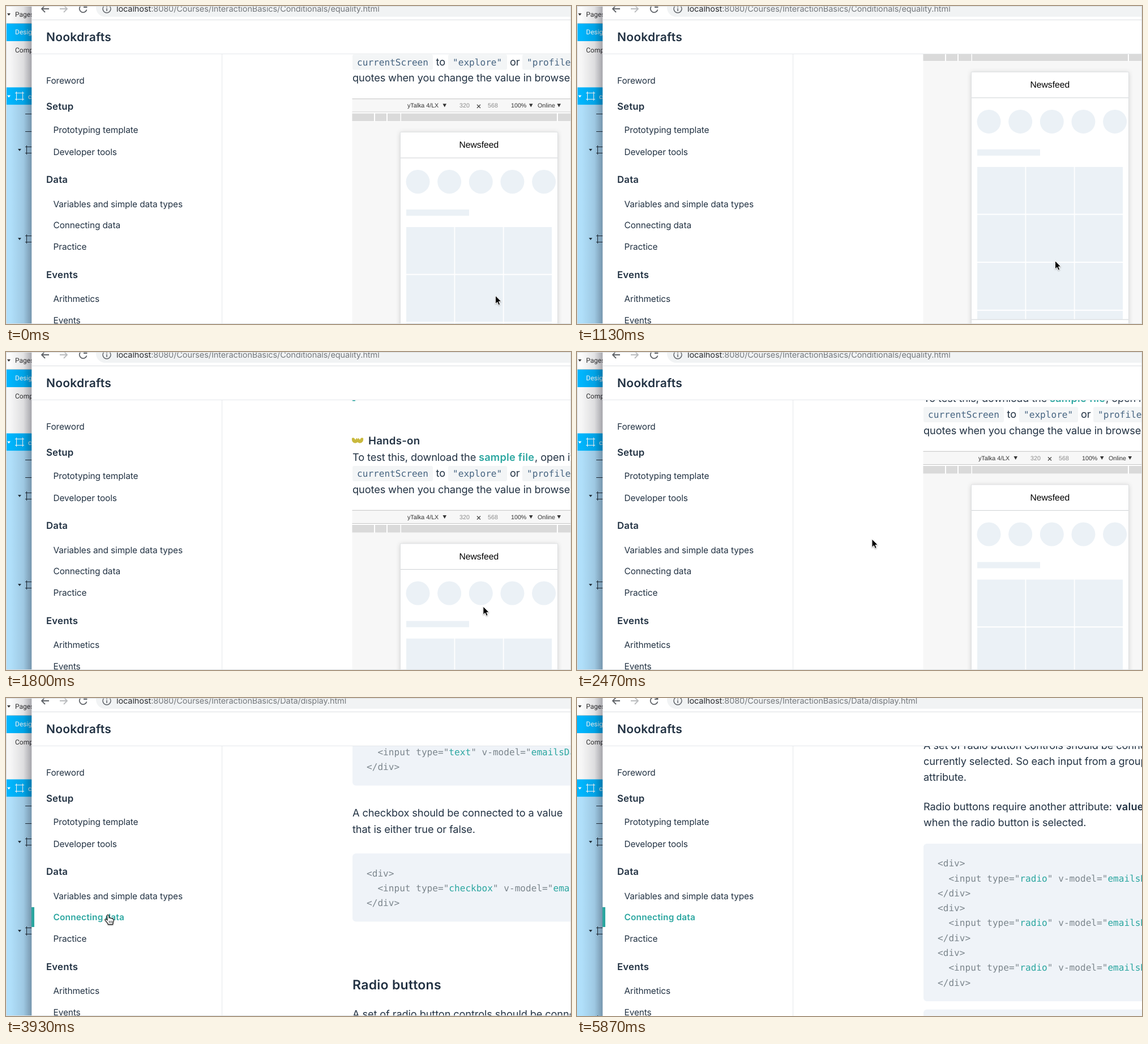
These frames come from a looping animation (998x561 px, 6870 ms). An HTML page:

```html
<!DOCTYPE html>
<html lang="en">
<head>
<meta charset="utf-8">
<title>Course page</title>
<style>
html, body { margin: 0; width: 100%; height: 100%; overflow: hidden; background: #fff; }
svg { display: block; position: absolute; left: 0; top: 0; }
text { white-space: pre; font-family: Inter, sans-serif; font-optical-sizing: none; letter-spacing: -.006em; text-rendering: geometricPrecision; }
.b { font-weight: 600; letter-spacing: .012em; }
.m { font-family: "DejaVu Sans Mono", monospace; letter-spacing: 0; }
.h { font-family: "Liberation Sans", Arial, sans-serif; letter-spacing: 0; }
.r { font-family: Roboto, sans-serif; letter-spacing: 0; }
.phone { filter: drop-shadow(0 1px 4px rgba(0,0,0,.16)); }
.cursor { filter: drop-shadow(0 1px 1px rgba(0,0,0,.3)); }
</style>
</head>
<body>
<script>
const INK = '#223243', TEAL = '#2ba6a0', LINE = '#e5e8eb', PALE = '#ebf1f6', GREY = '#a5afb9';
const LOOP = 6870, STEP = 200 / 3;

const esc = s => s.replace(/&/g, '&amp;').replace(/</g, '&lt;');
const rect = (x, y, w, h, fill, more = '') =>
  `<rect x="${x}" y="${y}" width="${w}" height="${h}" fill="${fill}" ${more}/>`;
const dot = (x, y, r, fill, more = '') => `<circle cx="${x}" cy="${y}" r="${r}" fill="${fill}" ${more}/>`;
const path = (d, more) => `<path d="${d}" ${more}/>`;
const line = (d, color, w = 1) => path(d, `fill="none" stroke="${color}" stroke-width="${w}"`);
const text = (x, y, s, size, fill = INK, cls = '', more = '') =>
  `<text x="${x}" y="${y}" font-size="${size}" fill="${fill}" class="${cls}" ${more}>${esc(s)}</text>`;
const body = (x, y, s) => text(x, y, s, 18.2);
const group = (id, inner, more = '') => `<g id="${id}" ${more}>${inner}</g>`;
const down = (x, y, w, h, fill) => path(`M${x} ${y}h${w}l${-w / 2} ${h}z`, `fill="${fill}"`);

// Design tool behind the browser window
function backdrop() {
  const frame = (x, y, c) => line(
    `M${x - 5.5} ${y - 8}v16M${x + 5.5} ${y - 8}v16M${x - 8} ${y - 5.5}h16M${x - 8} ${y + 5.5}h16`, c, 1.1);
  let s = rect(0, 0, 46, 143, '#f6f6f6') + rect(0, 0, 46, 31, '#fcfcfc')
    + rect(0, 31, 46, 31, '#00b5fd') + rect(0, 143.5, 46, 31, '#00b5fd') + rect(0, 174.5, 46, 387, '#b0dffa')
    + line('M0 30.5H46', '#d4d4d4')
    + down(2, 13, 6, 4, '#333') + text(16, 18.5, 'Pages', 12, '#333', 'r')
    + text(16, 50, 'Design', 12, '#fff', 'r') + text(16, 81.5, 'Components', 12, '#333', 'r')
    + down(2, 157.5, 6, 4, '#fff') + frame(24, 159, '#fff') + text(39, 164, 'c', 12, '#fff', 'r')
    + line('M34 190.5H46M34 221.5H46', '#25333d', 1.2);
  for (const y of [254, 411, 568]) s += down(21, y - 2, 6, 4, '#25333d') + frame(42, y, '#25333d');
  return s + rect(8, 0, 38, 561, 'url(#shade)');
}

function browserBar() {
  return rect(45.3, 0, 953, 561, '#fff')
    + rect(159, -13, 900, 32, '#f1f3f4', 'rx="16"')
    + line('M76 5H63M69 -1L63 5L69 11', '#5f6368', 1.8)
    + line('M95 5H108M102 -1L108 5L102 11', '#babcbe', 1.8)
    + line('M141.5 1A6.5 6.5 0 1 0 142.5 6.5M142.5 -3V2H137', '#5f6368', 1.8)
    + line('M171 5a7 7 0 1 0 14 0a7 7 0 1 0 -14 0M178 4V9M178 1V2.6', '#5f6368', 1.5)
    + `<text x="195" y="10" font-size="14.5" fill="#74787c"><tspan fill="#2b2d30">localhost</tspan>`
    + `<tspan>:8080/Courses/InteractionBasics/</tspan><tspan id="file"></tspan></text>`
    + line('M45 24.5H998', '#dcdfe2')
    + text(71, 62, 'Nookdrafts', 21, INK, 'b')
    + line('M45 84.5H998M381.5 85V561', LINE);
}

const links = [['Prototyping template', 224], ['Developer tools', 263], ['Variables and simple data types', 354.5],
  ['Connecting data', 392], ['Practice', 430], ['Arithmetics', 521.5], ['Events', 560]];
function sidebar() {
  return text(71, 137, 'Foreword', 15.4)
    + [['Setup', 183], ['Data', 312], ['Events', 480]].map(([s, y]) => text(71, y, s, 16.8, INK, 'b')).join('')
    + links.map(([s, y], i) => text(83.5, y, s, 15.4, INK, '', `id="link${i}"`)).join('')
    + rect(45, 369, 5, 35, TEAL, 'id="bar"');
}

// First page: hands-on section with the phone preview
const cols = [707, 793.3, 879.6];
function explore() {
  let s = rect(707, 474.5, 111, 11, PALE);
  for (let i = 0; i < 5; i++) s += dot(727.5 + 55.65 * i, 425.5, 21, PALE);
  for (let r = 0; r < 4; r++) for (const x of cols) s += rect(x, 505.5 + 84.6 * r, 84.5, r < 3 ? 82.6 : 15, PALE);
  return s;
}
function profile() {
  return dot(734.5, 425.5, 28, PALE) + rect(776, 411.5, 125, 11, PALE) + rect(776, 429, 75, 10.5, PALE)
    + cols.map(x => rect(x, 481.5, 84.5, 18.5, PALE)).join('')
    + rect(707, 516, 257, 173.5, PALE) + rect(707, 704, 257, 71, PALE);
}
function lesson() {
  const pill = (x, w, s) => rect(x, 201, w, 27, '#f3f5f6', 'rx="3"') + text(x + 8, 220, s, 16.1, '#476582', 'm');
  let s = rect(612, 84, 5, 2.5, TEAL)
    + path('M611 152q3-2 5 1l1 2l2-3q2 0 2 3q0-3 2-3l2 3l1-2q2-3 5-1q1 5-3 8q-4 2-7-1q-3 3-7 1q-4-3-3-8z', 'fill="#c9b93d"')
    + text(640, 163, 'Hands-on', 18.7, INK, 'b')
    + body(612, 191.5, 'To test this, download the ') + text(835, 191.5, 'sample file', 18.2, TEAL, 'b')
    + body(934, 191.5, ', open it in')
    + pill(612, 142, 'currentScreen') + body(759.5, 220, 'to') + pill(781, 104, '"explore"')
    + body(890, 220, 'or') + pill(912, 104, '"profile"')
    + body(612, 248.5, 'quotes when you change the value in browser')
    + rect(611.5, 279, 387, 574.5, '#f7f7f7') + line('M611.5 279.3H998M611.5 302.5H998', '#c4c4c4');
  const label = (x, t, c = '#333') => text(x, 294.5, t, 10.7, c, 'h');
  s += label(709, 'yTalka 4/LX') + label(801, '320', '#8a8a8a') + label(851, '568', '#8a8a8a')
    + label(892, '100%') + label(939, 'Online') + line('M832 289.5l6 6m0-6l-6 6', '#444', 1.2)
    + [771.5, 924, 973.5].map(x => down(x, 288, 6.5, 6, '#333')).join('')
    + rect(611.5, 303, 387, 16, '#fff')
    + [[611.5, 38.5], [652, 20], [674, 22.5], [698, 275], [975, 23]].map(([x, w]) => rect(x, 305, w, 13.5, '#dadada')).join('')
    + rect(696.5, 338, 278, 493.5, '#fff', 'class="phone"')
    + line('M696.5 383.5H974.5', '#cfd2d5')
    + text(835.3, 365.5, 'Newsfeed', 15.7, '#000', 'h', 'text-anchor="middle"')
    + group('explore', explore()) + group('profile', profile())
    + rect(696.5, 775, 278, 56.5, '#fff') + line('M696.5 774.7H974.5', '#cfd2d5');
  ['Newsfeed', 'Explore', 'Profile'].forEach((t, i) => {
    const x = 742.3 + 93 * i;
    s += dot(x, 795.7, 14, GREY) + text(x, 822, t, 10.6, '#98a2ad', 'h', 'text-anchor="middle"');
  });
  return s + line('M696.5 338H974.5V831.5H696.5z', '#dfe1e3')
    + group('touch', dot(0, 0, 19, '#fff', 'opacity=".75"') + dot(0, 0, 16.5, '#7c858c'));
}

// Second page: form controls
function code(y, kind, n) {
  let s = rect(612, y, 420, 41.6 + 26.27 * n * 3, '#eff3f8', 'rx="6"'), row = y + 40.4;
  const put = (x, inner) => {
    s += `<text class="m" x="${x}" y="${row}" font-size="16.1" fill="#7c868d">${inner}</text>`;
    row += 26.27;
  };
  const str = v => `"<tspan fill="${TEAL}">${v}</tspan>"`;
  for (let i = 0; i < n; i++) {
    put(637, '&lt;div>');
    put(656.4, `&lt;input type=${str(kind)} v-model=${str('emailsDaily')}`);
    put(637, '&lt;/div>');
  }
  return s;
}
function forms() {
  return text(612, -560, 'Connecting data', 31, INK, 'b')
    + body(612, -505, 'Form controls can be connected to data with') + body(612, -476.5, 'the v-model attribute.')
    + code(-440, 'text', 1)
    + body(612, -265, 'A checkbox should be connected to a value') + body(612, -236.5, 'that is either true or false.')
    + code(-200, 'checkbox', 1)
    + text(612, 40, 'Radio buttons', 23, INK, 'b')
    + body(612, 89.5, 'A set of radio button controls should be connected')
    + body(612, 118, 'currently selected. So each input from a group')
    + body(612, 146.3, 'attribute.')
    + body(612, 198, 'Radio buttons require another attribute:') + text(952, 198, 'value', 18.2, INK, 'b')
    + body(612, 226.3, 'when the radio button is selected.')
    + code(257, 'radio', 3) + code(549.5, 'radio', 1);
}

document.body.innerHTML = `<svg width="998" height="561" viewBox="0 0 998 561">
<defs>
<linearGradient id="shade"><stop offset="0" stop-color="#001" stop-opacity="0"/>
<stop offset=".6" stop-color="#001" stop-opacity=".1"/><stop offset="1" stop-color="#001" stop-opacity=".34"/></linearGradient>
<clipPath id="view"><path d="M382 85H998V561H382z"/></clipPath>
</defs>`
  + backdrop() + browserBar() + sidebar()
  + `<g clip-path="url(#view)">${group('lesson', lesson())}${group('forms', forms())}</g>`
  + group('arrow', path('M0 0V14.5L3.4 11.4L5.6 16.6L8.2 15.5L6 10.4H10.4Z', 'stroke="#fff" stroke-width="1"'), 'class="cursor"')
  + group('hand', path('M-1.6 1.6Q0 -1 1.6 1.6L2.2 6Q4 5 5 6.6Q7 6 8 7.6Q10.3 7.6 10.2 10L9.3 14L8.5 17.5H.5L-1 14.5L-5 9.8Q-5.5 7 -2.7 8.5L-1 9.8Z',
    'fill="#fff" stroke="#222" stroke-width="1.3"') + line('M2.4 11v4M4.9 11v4M7.3 11v4', '#222', .9), 'class="cursor"')
  + group('edge', line('M.5 .5H997.5V560.5H.5z', '#d9dde0')) + '</svg>';

const $ = id => document.getElementById(id);
const move = (id, x, y) => $(id).setAttribute('transform', `translate(${x} ${y})`);
const show = (id, on) => $(id).style.display = on ? '' : 'none';

// Rows: time, then values, linear in between
const scroll = [[400, 115.5], [467, 150], [533, 240], [600, 306.5], [700, 312], [930, 306], [1030, 272], [1133, 222.5],
  [1267, 130], [1400, 62], [1533, 22], [1667, 5], [1800, 0], [2267, 0], [2400, 60], [2600, 190], [2800, 245], [2930, 252]];
const scroll2 = [[3730, 700], [3930, 480], [4130, 210], [4270, 80], [4400, 20], [4530, 0]];
const pointer = [[67, 864.5, 511], [133, 857, 487], [200, 844.5, 449.5], [1800, 844.5, 449.5], [2000, 521, 330],
  [2600, 521, 330], [2930, 180, 280], [3200, 171, 269.5], [3400, 171, 269.5], [3600, 180, 382],
  [4467, 180, 382], [4667, 290, 552], [4800, 360, 660]];
const finger = [[2667, 928, 796], [2930, 941, 705.5]];
// Rows: from, to, link
const hovers = [[2930, 3400, 1], [3467, 3533, 2], [3533, 3667, 3], [4600, 4720, 5], [4720, 4800, 6]];
const CLICK = 3667, SWAP = 2667;

function at(rows, t) {
  const i = rows.findIndex(r => r[0] > t);
  if (i < 0) return rows[rows.length - 1].slice(1);
  if (!i) return rows[0].slice(1);
  const a = rows[i - 1], b = rows[i], k = (t - a[0]) / (b[0] - a[0]);
  return a.slice(1).map((v, j) => v + (b[j + 1] - v) * k);
}

function draw(time) {
  const t = Math.floor((time + 3) / STEP) * STEP + 1;
  const second = t >= CLICK, hand = t >= 2930, [x, y] = at(pointer, t);
  show('lesson', !second);
  show('forms', second);
  show('bar', second);
  $('file').textContent = second ? 'Data/display.html' : 'Conditionals/equality.html';
  move('lesson', 0, -at(scroll, t)[0]);
  move('forms', 0, at(scroll2, t)[0]);
  show('explore', t < SWAP);
  show('profile', t >= SWAP);
  show('touch', t >= SWAP);
  move('touch', ...at(finger, t));
  show('arrow', !hand);
  show('hand', hand && t < 4800);
  move('arrow', x, y);
  move('hand', x, y);
  const hover = hovers.find(h => t >= h[0] && t < h[1]);
  links.forEach((_, i) => {
    const active = second && i === 3;
    $('link' + i).setAttribute('class', active ? 'b' : '');
    $('link' + i).setAttribute('fill', active || hover && hover[2] === i ? TEAL : INK);
  });
  $('edge').style.opacity = Math.max(0, Math.min(1, (5330 - t) / 400));
}

const start = performance.now();
function tick() {
  draw((performance.now() - start) % LOOP);
  requestAnimationFrame(tick);
}
tick();
</script>
</body>
</html>
```
